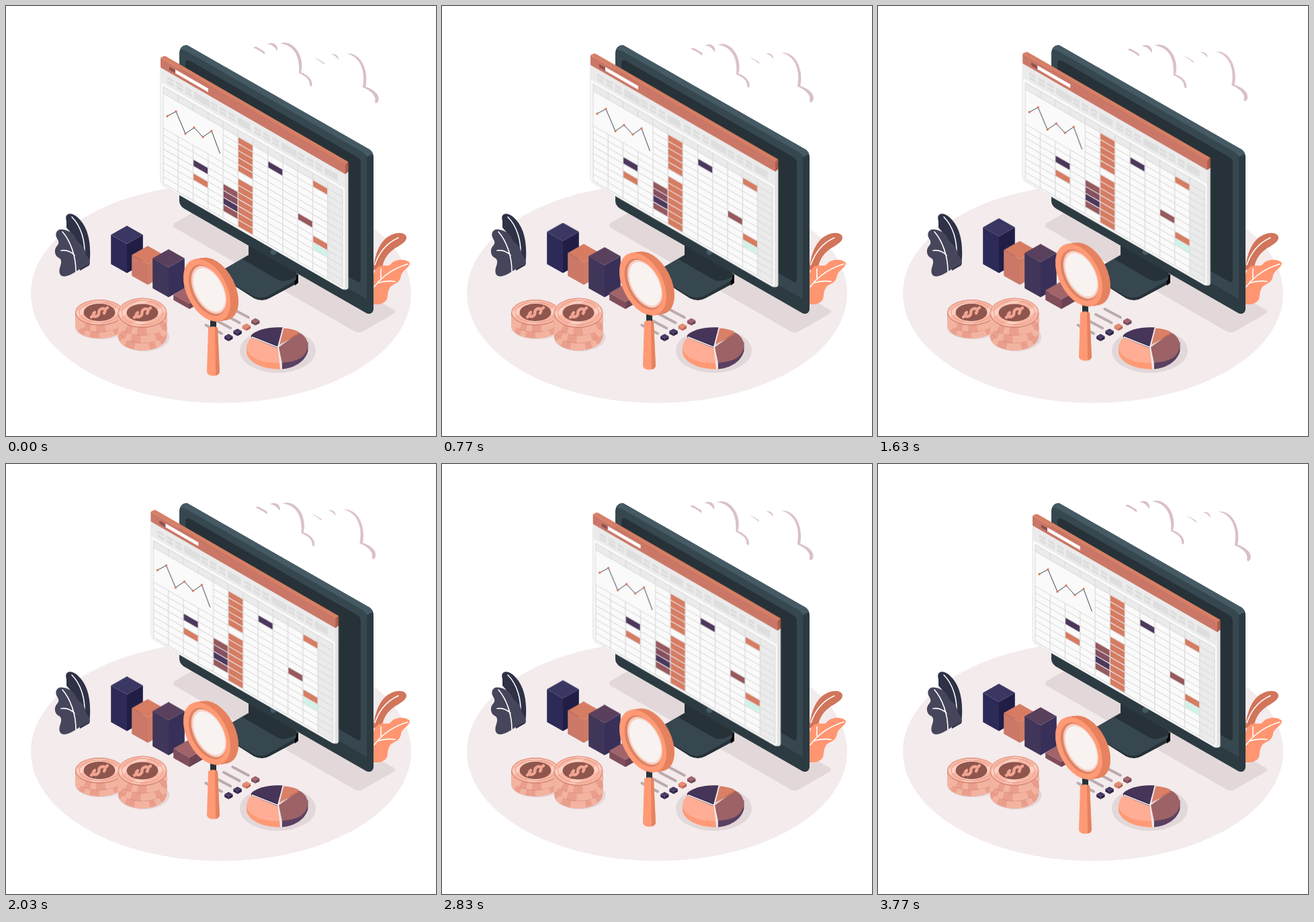
Animation, 640 px wide and 640 px high, one loop 3810 ms. Source, as an HTML page:

```html
<!DOCTYPE html>
<html lang="en">
<head>
<meta charset="utf-8">
<title>Spreadsheet analysis</title>
<style>
html, body { margin: 0; height: 100%; overflow: hidden; background: #fff; }
svg { display: block; width: 100vw; height: 100vh; }
.slide, .bob { animation: 3810ms infinite; }
.slide { animation-name: slide; }
.bob { animation-name: bob; }
/* quick start, short rest at the far end */
@keyframes slide {
  0% { transform: none; animation-timing-function: ease-out; }
  47.2%, 52.5% { transform: translate(var(--x), var(--y)); animation-timing-function: ease-out; }
  100% { transform: none; }
}
@keyframes bob {
  0%, 100% { transform: none; animation-timing-function: cubic-bezier(.37, 0, .63, 1); }
  46.5% { transform: translate(var(--x, 0px), var(--y)); animation-timing-function: cubic-bezier(.37, 0, .63, 1); }
}
.vein { fill: none; stroke: #fff; stroke-width: 1.6; stroke-linecap: round; }
</style>
</head>
<body>
<svg viewBox="0 0 640 640" xmlns="http://www.w3.org/2000/svg">
  <ellipse cx="320" cy="428" rx="283" ry="163" fill="#f4ebec"/>
  <path d="M251 323L296 297Q301 294 306 297L577 452Q581 455 577 458L530 485Q525 487 520 485L251 330Q247 326 251 323Z" fill="#e3d8d9"/>

  <g fill="#d9bfc3">
    <g class="slide" style="--x:3.7px;--y:3px">
      <path d="M368 62Q371 59 375 62L385 68V72Q378 66 368 62Z"/>
      <path d="M389 57C396 53 402 56 404 62V67C400 61 396 57 389 57Z"/>
      <path d="M408 56C424 48 446 72 439 99L436 98C438 74 427 57 408 56Z"/>
      <path d="M436 98C449 101 458 111 455 120L452 118C453 110 446 104 436 100Z"/>
    </g>
    <g class="bob" style="--x:-4.6px;--y:-3px">
      <path d="M459 77Q463 78 474 85V87Q466 81 459 77Z"/>
      <path d="M484 72C490 70 495 74 495 80C491 75 489 73 484 72Z"/>
      <path d="M507 71C525 68 541 92 535 121L531 120C536 94 525 74 507 71Z"/>
      <path d="M531 119C545 122 558 132 554 142L551 145L549 143C552 134 543 126 531 121Z"/>
    </g>
  </g>

  <g id="plants">
    <path fill="#2f3146" d="M90 320C86 308 97 306 106 314C122 328 128 352 124 386L110 394C110 365 103 342 90 330Z"/>
    <path class="vein" d="M98 314C112 328 118 350 117 372"/>
    <path fill="#45455b" d="M79 333C87 331 101 337 104 346C106 353 116 355 118 366C119 374 124 372 125 384C112 388 100 400 90 402C81 404 78 398 80 390C82 384 84 378 79 375C72 372 71 362 76 357C80 352 78 350 76 346C73 341 74 335 79 333Z"/>
    <path class="vein" d="M84 336C96 350 104 372 104 395M82 364Q93 362 102 371"/>
    <path fill="#d1755b" d="M546 394C550 365 558 345 578 339C592 335 600 342 594 350C585 360 566 362 560 388Z"/>
    <path class="vein" d="M549 385C556 365 568 352 584 345"/>
    <path fill="#ff9671" d="M546 440V402C553 378 564 390 572 385C578 376 595 376 601 382C602 389 590 393 588 401C587 414 574 413 571 420C566 428 570 436 564 440C558 445 552 444 546 444Z"/>
    <path class="vein" d="M548 418C560 402 578 390 598 384M558 391V405M554 412Q566 408 579 410"/>
  </g>

  <g id="monitor">
    <path fill="#263238" d="M322 396L360 373L435 402V412L392 435Q381 441 369 435L322 405Z"/>
    <path fill="#000" d="M429 402L435 399V412L430 416Z"/>
    <path fill="#37474f" d="M322 393L360 371L431 402Q434 405 430 409L391 431Q380 437 369 432L322 405Z"/>
    <path fill="#263238" d="M361 350V371L352 377L404 407Q414 413 432 403L434 399L408 375V360Z"/>
    <path fill="#2b3b41" d="M258 70Q259 58 270 58.500L541 213.500Q547 218 547 225V452Q545 460 537 457.500L265 301.500Q258 297 258 290Z"/>
    <path fill="#37474f" d="M258 72Q259 64 267 66L530 217Q537 222 537 230V436L258 275Z"/>
    <path fill="#455a64" d="M259 66Q262 57 270 58.500L541 213.500Q545 216 546 220L537 225Q535 220 530 217L268 67Q262 64 259 66Z"/>
    <path fill="#263238" d="M267 84Q268 79 273 81L523 225Q528 228 528 234V408Q527 413 522 410L267 263Z"/>
    <circle cx="398" cy="366" r="4.5" fill="#455a64"/>
  </g>

  <g class="slide" style="--x:-15px;--y:-6.2px">
    <path fill="#d67f65" d="M230 77L235 74.500Q237 74 239 75.500L509.500 232L505 236.500Z"/>
    <path fill="#b05c4c" d="M505 236L509.500 232V246.500L505 250Z"/>
    <path fill="#e4e4e4" d="M505 250L509.500 246.500V419Q509 423 503 422Z"/>
    <g id="sheet" transform="translate(230 77) skewY(30)"></g>
    <path fill="none" stroke="#3d4250" d="M240 164L253 157L267 190L280 181L293 195L306 186L318.500 219.500"/>
    <g id="dots" fill="#d8755a"></g>
  </g>

  <g id="bars"></g>
  <g id="legend"></g>

  <g id="pie">
    <ellipse cx="404.500" cy="513" rx="56.500" ry="33" fill="#e3d8d9"/>
    <path fill="#ff9a75" d="M358 507V517C362 532 385 541 408 540.500L405 508Z"/>
    <path fill="#ffad95" d="M358 508Q359 498 366 493L404 507L408 531C384 533 359 524 358 508Z"/>
    <path fill="#5a4061" d="M449.500 500V513C446 529 429 539 411 540.500V530Z"/>
    <path fill="#9c6266" d="M436 486C449 492 452 505 447 514C442 526 427 530 411 531L406 508Z"/>
    <path fill="#2e2850" d="M365 490V493L404 509L412 484Z"/>
    <path fill="#473559" d="M365 490C373 481 394 477 412 478.500L404 505Z"/>
    <path fill="#c96f56" d="M407 504L435 489V485Z"/>
    <path fill="#d98067" d="M413 479.500Q426 480 436 485L407 504Z"/>
    <path fill="none" stroke="#f4ebec" stroke-width="1.800" d="M412.500 479L405 507L409.500 540M366 492.500L405 508"/>
  </g>

  <g id="coins"></g>

  <g class="bob" style="--y:-22.800px">
    <rect x="304" y="464" width="9" height="18" fill="#263238"/>
    <path fill="#ff9a75" d="M301 479Q308 475 315 479L318 545Q317 550 308.500 550.500Q300 550 299 545Z"/>
    <path fill="#e6825f" d="M311 477.500L315 479L318 545Q317 549 312 550Z"/>
    <g id="lens"></g>
  </g>
</svg>
<script>
const $ = id => document.getElementById(id);
const poly = (pts, fill) => `<polygon points="${pts}" fill="${fill}"/>`;
const rect = (x, y, w, h, fill) => `<rect x="${x}" y="${y}" width="${w}" height="${h}" fill="${fill}"/>`;

// isometric box: x centre, y of the top vertex, half width, half depth, wall height
function box(x, y, w, d, h, [top, left, right]) {
  return poly([x - w, y + d, x, y + 2 * d, x, y + 2 * d + h, x - w, y + d + h], left) +
    poly([x + w, y + d, x, y + 2 * d, x, y + 2 * d + h, x + w, y + d + h], right) +
    poly([x, y, x + w, y + d, x, y + 2 * d, x - w, y + d], top);
}

// bars grow upwards while a clip keeps their feet in place
$('bars').innerHTML = [
  [180, 327, 397.5, 11.3, ['#3a3763', '#2d2a57', '#201e45']],
  [211, 357, 415, 7.5, ['#d67c63', '#cb7868', '#cf7c66']],
  [242, 362, 433.5, 8, ['#59405d', '#403659', '#383058']],
  [273, 416, 451, 6.5, ['#a0646a', '#804e5a', '#6b4354']]
].map(([x, top, foot, rise, cols], i) => `<clipPath id="c${i}"><polygon points="${
    [x - 24, 0, x + 24, 0, x + 24, foot - 13.5, x, foot, x - 24, foot - 13.5]}"/></clipPath>
  <g clip-path="url(#c${i})"><g class="bob" style="--y:${-rise}px">${box(x, top, 23.8, 13.5, 90, cols)}</g></g>`).join('');

const dark = ['#473a63', '#33294f', '#271f40'];
$('legend').innerHTML = [dark, dark, ['#e58b70', '#d67c63', '#ba6a5a'], ['#a0646a', '#804e5a', '#6b4354']]
  .map((cols, i) => {
    const x = 297.5 + 13.3 * i, y = 475 - 8 * i;
    return `<path d="M${x} ${y}l23.500 12.500" stroke="#bbaaae" stroke-width="4" stroke-linecap="round"/>` +
      box(331.3 + 13.3 * i, 488 - 7.8 * i, 6.2, 3.4, 4.2, cols);
  }).join('');

// spreadsheet, drawn flat and skewed by its group
const C = 22.25, R = 10.3, X = 4, Y = 40.5, W = 12 * C, H = 14 * R;
const cell = (c, r, fill) => rect(X + c * C + .7, Y + r * R + .7, C - 1.4, R - 1.4, fill);
const orange = '#d67c63', brown = '#96595d', plum = '#4c385c';
let s = `<rect y="14" width="275" height="174" rx="5" fill="#fafafa" stroke="#d8d8d8" stroke-width=".8"/>` +
  rect(0, 14, 275, 22, '#ebebeb') + rect(0, 0, 275, 14.5, '#cb7767') +
  rect(13, 5.5, 9, 5, '#8f5250') + rect(22, 4.8, 49, 5.5, '#fff');
for (let g = 0; g < 4; g++) {
  const x = 10 + 64.8 * g;
  for (let i = 0; i < 3; i++) for (const y of [21.5, 27.5]) s += rect(x + 13.3 * i, y, 9.8, 4.3, '#dedede');
  s += rect(x + 40, 21.5, g % 2 ? 19 : 23, 10.3, '#dedede');
}
s += rect(X, Y, W, R, '#ebebeb') + rect(X + 11 * C, Y, C, H, '#ebebeb');
let grid = '';
for (let r = 0; r <= 14; r++) grid += `M${X} ${Y + r * R}h${W}`;
for (let c = 0; c <= 12; c++) grid += `M${X + c * C} ${Y}v${H}`;
s += `<path d="${grid}" stroke="#dcdcdc" stroke-width="1.300"/>` + rect(X + .7, Y + R + .7, 4 * C - 1.4, 5 * R - 1.4, '#fafafa');
for (let r = 1; r < 14; r++) if (r !== 6) s += cell(5, r, orange);
[[2, 8, plum], [2, 10, orange], [4, 9, brown], [4, 10, '#85505f'], [4, 11, plum], [4, 12, brown],
 [7, 2, plum], [10, 1, orange], [9, 7, brown], [10, 9, orange], [10, 10, '#d0f2e8']]
  .forEach(a => s += cell(...a));
$('sheet').innerHTML = s;
$('dots').innerHTML = [[240, 164], [253, 157], [267, 190], [280, 181], [293, 195], [306, 186]]
  .map(([x, y]) => `<circle cx="${x}" cy="${y}" r="1.700"/>`).join('');

function stack(x, y, rx, ry, n, th) {
  const id = 'k' + x, arc = `A${rx} ${ry} 0 0 0 ${x + rx}`;
  const oval = (a, b, extra) => `<ellipse cx="${x}" cy="${y}" rx="${a}" ry="${b}" ${extra}/>`;
  const wall = (t, h) => `M${x - rx} ${t}v${h}${arc} ${t + h}v${-h}Z`;
  let rims = '';
  for (let i = n - 1; i >= 0; i--) {
    const t = y + i * th;
    rims += `<path d="${wall(t, th)}" fill="#ea9f8c"/>
      <path d="M${x - rx} ${t + th / 2}${arc} ${t + th / 2}" fill="none" stroke="#f3b3a1" stroke-width="${th}" stroke-dasharray="22 9 8 14" stroke-dashoffset="${i * 9}"/>
      <ellipse cx="${x}" cy="${t}" rx="${rx}" ry="${ry}" fill="#f3ad9a" stroke="#c97a68"/>`;
  }
  return `<ellipse cx="${x + 2}" cy="${y + n * th + 2}" rx="${rx + 2}" ry="${ry - 1}" fill="#e3d8d9"/>
    <clipPath id="${id}s"><path d="${wall(y, n * th)}"/>${oval(rx, ry, '')}</clipPath>
    <clipPath id="${id}">${oval(rx - 2, ry - 2, '')}</clipPath>
    <g clip-path="url(#${id}s)">${rims}</g>` + oval(rx - 2, ry - 2, 'fill="#f9b8a5"') +
    `<path clip-path="url(#${id})" d="M${x - 42} ${y + 8}l52 -30M${x - 20} ${y + 24}l60 -34" stroke="#ffd0c2" stroke-width="8"/>` +
    oval(rx - 6, ry - 4, 'fill="none" stroke="#e39785" stroke-width="1"') + oval(23.5, 13, 'fill="#8f564e"') +
    `<path transform="translate(${x} ${y})" d="M-7 0C-12 4 -8 8 -3 5C2 2 -3 -1 1 -4C6 -8 11 -4 7 1M-12 7L-8 4M8 -4L12 -7" fill="none" stroke="#efa491" stroke-width="4.500" stroke-linecap="round"/>`;
}
$('coins').innerHTML = stack(139, 456, 36, 19, 2, 10) + stack(203, 456.5, 36.500, 22, 3, 11.5);

const ring = (x, y, a, b, fill) => `<ellipse rx="${b}" ry="${a}" transform="translate(${x} ${y}) rotate(-27)" fill="${fill}"/>`;
let lens = '';
for (let i = 12; i > 0; i--) lens += ring(299 + i, 423 - i * .15, 50, 30, '#e6825f');
$('lens').innerHTML = lens + ring(299, 423, 50, 30, '#ff9a75') + ring(300, 423, 41, 24, '#dc8266') +
  ring(302, 422.5, 38.5, 22, '#f9cdbd') + ring(302.5, 422.5, 35, 20, '#f8f2f1');
</script>
</body>
</html>
```
